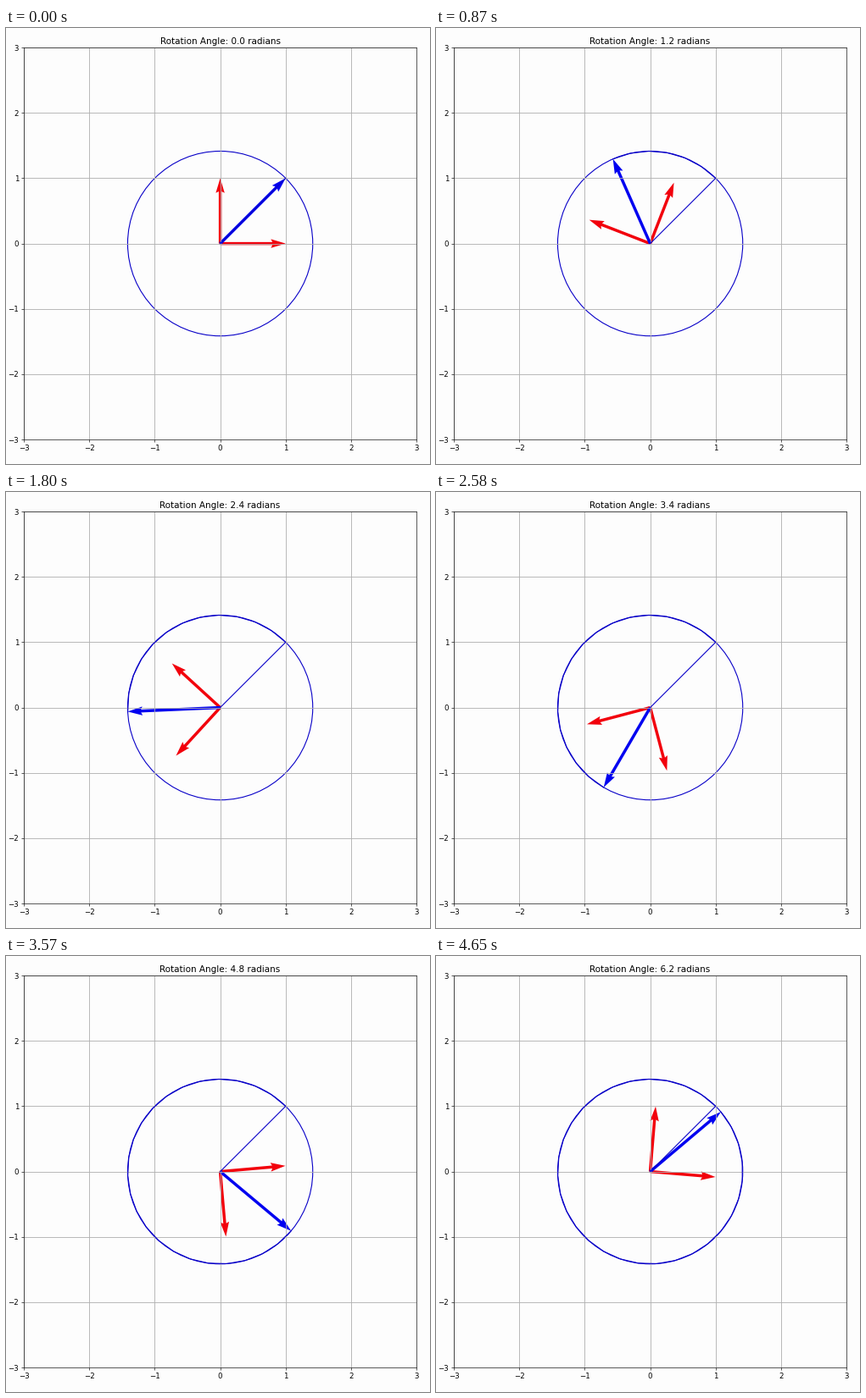
A matplotlib script that plays this animation: 500x515 px, repeating every 4.68 s.

```python
import numpy as np
import matplotlib.pyplot as plt
from matplotlib.animation import FuncAnimation

W, H, DPI = 500, 515, 100
FRAMES, INTERVAL = 156, 30
STEP, HOLD = 0.2, 5    # radians per move, frames per move
SCALE = 0.62           # shrink of the default plot metrics
LEFT, BOTTOM, SIDE = 21.1, 28.9, 463
PAPER, INK = "#fdfdfd", "#1c1c1c"
LINE_BLUE = "#0800c8"
ARROW_BLUE, ARROW_RED = "#0000f0", "#f2000c"
RADIUS = np.sqrt(2)

fig = plt.figure(figsize=(W / DPI, H / DPI), dpi=DPI, facecolor=PAPER)
ax = fig.add_axes([LEFT / W, BOTTOM / H, SIDE / W, SIDE / H], facecolor=PAPER)
ax.set(xlim=(-3, 3), ylim=(-3, 3), xticks=range(-3, 4), yticks=range(-3, 4))
ax.grid(True, color="#b0b0b0", lw=0.62)
ax.tick_params(labelsize=10 * SCALE, length=3.5 * SCALE, pad=3.5 * SCALE,
               width=0.52, color=INK)
for spine in ax.spines.values():
    spine.set(linewidth=0.52, edgecolor=INK)
title = ax.set_title("", fontsize=12 * SCALE, pad=2.9)

ax.add_patch(plt.Circle((0, 0), RADIUS, fill=False, ec=LINE_BLUE, lw=0.8))
trail, = ax.plot([], [], color=LINE_BLUE, lw=0.8)


def arrows(count, color):
    zeros = np.zeros(count)
    return ax.quiver(zeros, zeros, zeros + 1, zeros, color=color,
                     angles="xy", scale_units="xy", scale=1, width=0.0075)


basis = arrows(2, ARROW_RED)
vector = arrows(1, ARROW_BLUE)


def update(i):
    move = (i + HOLD // 2) // HOLD
    angle = STEP * move
    c, s = np.cos(angle), np.sin(angle)
    basis.set_UVC([c, -s], [s, c])
    vector.set_UVC([c - s], [s + c])

    path = np.pi / 4 + STEP * np.arange(move + 1)
    trail.set_data(np.append(0, RADIUS * np.cos(path)),
                   np.append(0, RADIUS * np.sin(path)))
    title.set_text(f"Rotation Angle: {angle:.1f} radians")
    return basis, vector, trail, title


anim = FuncAnimation(fig, update, frames=FRAMES, interval=INTERVAL,
                     init_func=lambda: update(0), repeat=True, repeat_delay=0)
plt.show()
```
